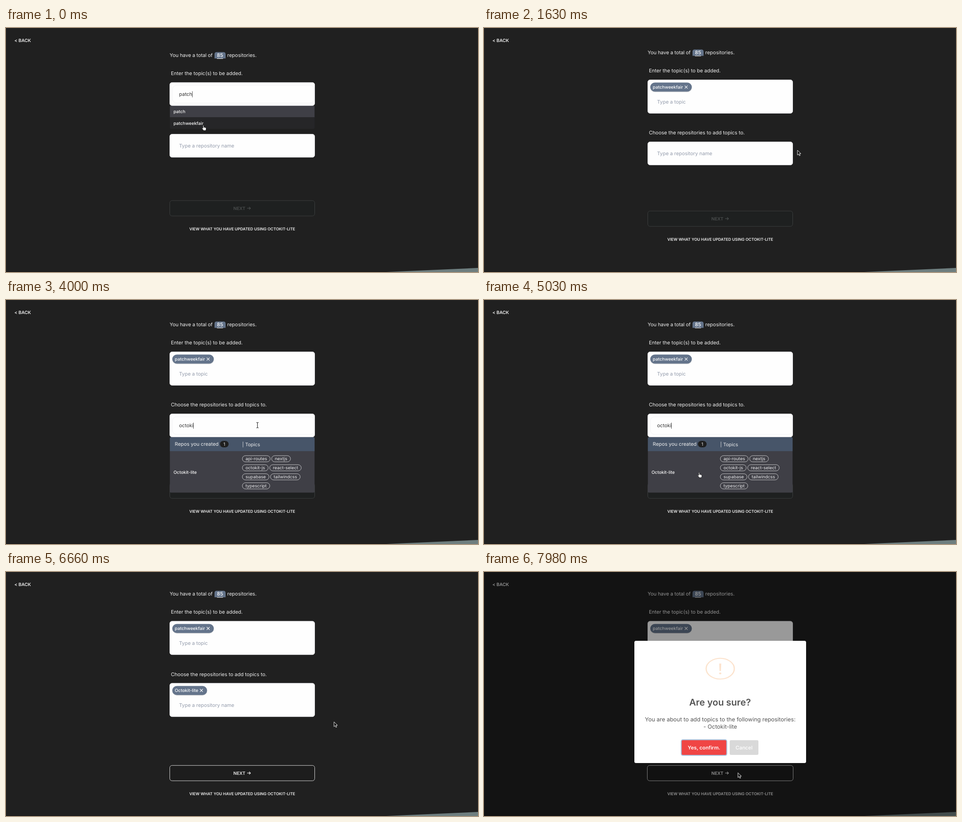
These frames come from a looping animation (1039 px wide and 539 px high, 8 s). An HTML page:

```html
<!DOCTYPE html>
<html lang="en">
<head>
<meta charset="utf-8">
<title>Add topics</title>
<style>
  html, body { margin: 0; width: 100%; height: 100%; overflow: hidden; background: #202020; }
  svg { display: block; width: 100%; height: 100%; }
  text { font-family: Inter, "Open Sans", sans-serif; white-space: pre; text-rendering: geometricPrecision; }
</style>
</head>
<body>
<svg id="stage" viewBox="0 0 1039 539"></svg>
<script>
const LOOP = 8000;
const LEFT = 360.5, WIDE = 319, BAR = 668;
const TOPIC = 'patchweekfair', REPO = 'Octokit-lite';
const SLATE = '#64748b', ZINC = '#3f3f46';
const stage = document.getElementById('stage');
const pen = document.createElement('canvas').getContext('2d');

// Each step changes part of the state and holds until the next one.
const steps = [
  [0, { level: 0, menu: 'match', focus: 'topic', typed: 'patch', caret: true, button: 'off', modal: null, cur: ['hand', 431, 215] }],
  [290, { level: 1, menu: 'topics', typed: '', caret: false, cur: ['hand', 437, 219] }],
  [440, { cur: ['hand', 530, 237] }],
  [590, { cur: ['arrow', 700, 258] }],
  [740, { cur: ['arrow', 758, 263.5] }],
  [1040, { cur: ['arrow', 764, 264] }],
  [1190, { cur: ['arrow', 778, 266] }],
  [1340, { menu: '', focus: '', cur: ['arrow', 772, 267] }],
  [1480, { cur: ['arrow', 745, 268] }],
  [1630, { cur: ['arrow', 690, 270] }],
  [1780, { cur: ['beam', 615, 275] }],
  [1930, { cur: ['beam', 568, 276] }],
  [2060, { focus: 'repo', caret: true, cur: ['beam', 553.5, 276.5] }],
  [2210, { menu: 'repos' }],
  [2660, { caret: false }],
  [3110, { caret: true }],
  [3410, { typed: 'o' }],
  [3560, { typed: 'oc', menu: 'single' }],
  [3710, { typed: 'oct' }],
  [3860, { typed: 'octok' }],
  [4000, { typed: 'octoki' }],
  [4440, { caret: false, cur: ['beam', 551, 284] }],
  [4590, { cur: ['arrow', 538, 316] }],
  [4740, { cur: ['hand', 508, 352] }],
  [4890, { caret: true, cur: ['hand', 480, 376] }],
  [5030, { cur: ['hand', 470, 381] }],
  [5330, { level: 2, menu: 'repos', typed: '', caret: false, button: 'on' }],
  [5480, { cur: ['hand', 530, 368] }],
  [5630, { cur: ['hand', 645, 340] }],
  [5780, { cur: ['arrow', 716, 323] }],
  [5920, { cur: ['arrow', 731.5, 319] }],
  [6510, { menu: '', focus: '' }],
  [6660, { cur: ['arrow', 722, 331] }],
  [6810, { cur: ['arrow', 682, 370] }],
  [6960, { cur: ['arrow', 626, 414] }],
  [7110, { button: 'hover', cur: ['hand', 581, 438] }],
  [7250, { cur: ['hand', 561, 445] }],
  [7390, { cur: ['hand', 555.5, 445.5] }],
  [7840, { button: 'on', modal: { scale: 0.75, dim: 0.1, tilt: 0.1, glow: 0 }, cur: ['arrow', 559, 443.5] }],
  [7980, { modal: { scale: 1, dim: 0.4, tilt: 0.74, glow: 0.4 } }]
];

const attrs = o => Object.entries(o).map(([k, v]) => `${k}="${v}"`).join(' ');
const rect = (x, y, width, height, fill, more = {}) =>
  `<rect ${attrs({ x, y, width, height, fill, ...more })}/>`;
const path = (d, more) => `<path ${attrs({ d, ...more })}/>`;
const text = (x, y, str, size = 11, fill = '#efefef', more = {}) =>
  `<text ${attrs({ x, y, 'font-size': size, fill, ...more })}>${str}</text>`;
const mid = { 'text-anchor': 'middle' };
const medium = { 'font-weight': 500 };
const bold = { 'font-weight': 600 };

function measure(str, size, weight = 400) {
  pen.font = `${weight} ${size}px Inter, "Open Sans", sans-serif`;
  pen.textRendering = 'geometricPrecision';
  return pen.measureText(str).width;
}

function backdrop() {
  return rect(0, 0, 1039, 539, '#202020') + rect(0, 538, 1039, 1, '#171315') +
    path('M837 539L1039 530V539Z', { fill: '#6e7e7f' }) +
    text(18.5, 30.8, '&lt; BACK', 9.85, '#efefef', bold);
}

function heading(y) {
  return text(360.3, y + 64, 'You have a total of', 11, '#efefef', { 'letter-spacing': -0.1 }) +
    path(`M459 ${y + 67.3}V${y + 58}q0-4.8 4.8-4.8H478.6q4.8 0 4.8 4.8V${y + 67.3}Z`, { fill: SLATE }) +
    text(471, y + 64, '85', 11, '#fff', { ...mid, ...medium }) +
    rect(464.3, y + 67, 13.4, 1.1, '#f4f4f4') +
    text(487, y + 64, 'repositories.') +
    text(363, y + 104, 'Enter the topic(s) to be added.');
}

function chip(y, label) {
  const w = measure(label, 9.75, 500) + 25;
  const x = 366 + w - 12.5;
  return rect(366, y + 1.2, w, 20, '#000', { rx: 10, opacity: 0.14 }) +
    rect(366, y, w, 20, SLATE, { rx: 10 }) +
    text(371.6, y + 13.5, label, 9.75, '#fff', medium) +
    path(`M${x - 3.2} ${y + 6.8}l6.4 6.4m0-6.4l-6.4 6.4`, { stroke: '#fff', 'stroke-width': 1.1 });
}

function field(y, label, hint, focused, s) {
  const h = label ? 73.8 : 51;
  const line = y + h - 25.2;
  const typed = focused ? s.typed : '';
  let out = rect(LEFT, y, WIDE, h, '#fefefe', { rx: 5, stroke: '#e4e4e7', 'stroke-width': 1 });
  if (focused) out += rect(366.3, line - 19.5, 312.5, 39, 'none', { rx: 9, stroke: '#efeff1', 'stroke-width': 0.8 });
  if (label) out += chip(y + 5.9, label);
  out += text(381, line + 4, typed || hint, 10.9, typed ? '#333' : '#949cac');
  if (focused && s.caret) out += rect(380.8 + measure(typed, 10.9), line - 6.5, 0.8, 13.5, '#222');
  return out;
}

function nextButton(y, mode, focused) {
  const [fill, edge, ink] = {
    off: ['#1e2020', '#3b3e3e', '#4b4e4e'],
    on: ['#1d1d1d', '#d4d4d4', '#ededed'],
    hover: ['#d2d2d2', '#d2d2d2', '#1c1c1c']
  }[mode];
  const grow = focused ? 1 : 0;
  return rect(LEFT - grow, y + 0.3, WIDE + 2 * grow, 33.9, fill, { rx: 5, stroke: edge, 'stroke-width': 1 }) +
    text(500.6, y + 20.8, 'NEXT', 9.7, ink, bold) +
    path(`M531 ${y + 17.2}h7.2m-3-3l3 3l-3 3`, { fill: 'none', stroke: ink, 'stroke-width': 1.2 });
}

const option = (y, str, x = 368.7) => text(x, y + 3.5, str, 9.7, '#fafafa', medium);

function tags(y, names) {
  let x = 520.2;
  return names.map(name => {
    const w = measure(name, 9.75) + 14;
    const out = rect(x, y - 6.8, w, 13.6, 'none', { rx: 6.8, stroke: '#e6e6e8', 'stroke-width': 0.8 }) +
      text(x + 7, y + 3.5, name, 9.75, '#ececee');
    x += w + 3.2;
    return out;
  }).join('');
}

function scrollbar(y, h, thumb) {
  return rect(BAR, y, LEFT + WIDE - BAR, h, '#334155') +
    rect(BAR, y, LEFT + WIDE - BAR, thumb, '#fff', { rx: 5.7 });
}

function repoHead(y, count, width) {
  const w = count > 9 ? 26 : 19;
  return rect(LEFT, y, width, 31, '#475569') +
    text(371.6, y + 19.2, 'Repos you created', 10.9) +
    rect(471, y + 8.3, w, 14.4, '#1f1f1f', { rx: 7.2 }) +
    text(471 + w / 2, y + 19, count, 9.75, '#eee', mid) +
    text(520, y + 19.8, '| Topics', 10.5);
}

const menus = {
  match: y => [51, rect(LEFT, y, WIDE, 25.6, ZINC) + rect(LEFT, y + 25.6, WIDE, 26, '#262628') +
    option(y + 12.8, 'patch') + option(y + 38.5, TOPIC)],
  topics: y => [171.3, rect(LEFT, y, WIDE, 172, ZINC) +
    ['challenge', 'css3', 'html', 'javascript', 'python', 'react']
      .map((name, i) => option(y + 24.4 + i * 25.7, name)).join('') +
    scrollbar(y, 172, 135.3)],
  repos: y => [171.2, rect(LEFT, y, WIDE, 172, ZINC) + repoHead(y, 73, BAR - LEFT) +
    option(y + 57, '01.112-ml-hmm') + tags(y + 47.8, ['hmm-viterbi-algorithm']) + tags(y + 67.7, ['python']) +
    option(y + 98.6, '50.012-network-notes') + tags(y + 99.2, ['network', 'restapi']) +
    option(y + 130.1, 'Allegro') + tags(y + 130.6, ['iot-device', 'kivy', 'laundry']) +
    option(y + 171, 'android-java-testing-exercises') +
    option(y + 171, 'No topics found for this repo', 520) +
    scrollbar(y, 172, 11.4)],
  single: y => [122.5, rect(LEFT, y, WIDE, 123, ZINC) + repoHead(y, 1, WIDE) + option(y + 77.2, REPO) +
    [['api-routes', 'nextjs'], ['octokit-js', 'react-select'], ['supabase', 'tailwindcss'], ['typescript']]
      .map((row, i) => tags(y + 47.8 + i * 19.95, row)).join('')]
};

function menu(name, y) {
  const [h, body] = menus[name](y);
  return `<clipPath id="menu">${rect(LEFT, y, WIDE, h, '#fff', { rx: 3 })}</clipPath>` +
    `<g clip-path="url(#menu)">${body}</g>`;
}

function dialog({ scale, dim, tilt, glow }) {
  const ink = '#545454', icon = '#f8bb86';
  return rect(0, 0, 1039, 539, '#000', { opacity: dim }) +
    `<g transform="translate(520 287) scale(${scale}) translate(-520 -287)">` +
    rect(331, 152, 378, 270, '#fff', { rx: 3.5 }) +
    `<g opacity="${glow}" transform="translate(520 213.6) scale(1 ${tilt})">` +
    `<circle r="31" fill="none" stroke="${icon}" stroke-width="2.8"/>` +
    path('M-2.3-15.5H2.3L1.5 7H-1.5Z', { fill: icon }) + `<circle cy="14" r="2.6" fill="${icon}"/></g>` +
    text(519.7, 295.4, 'Are you sure?', 20.4, ink, { ...mid, ...bold }) +
    text(520, 330.2, 'You are about to add topics to the following repositories:', 12.45, ink, mid) +
    text(520, 346, '- ' + REPO, 12.45, ink, mid) +
    rect(434.2, 370.6, 100.2, 34.4, '#f04545', { rx: 3.5, stroke: '#a9c3df', 'stroke-width': 2 }) +
    text(484.3, 392, 'Yes, confirm.', 11.2, '#fff', { ...mid, ...bold }) +
    rect(540.8, 371.5, 63.3, 32.5, '#d9d9d9', { rx: 3 }) +
    text(572.4, 392, 'Cancel', 11.2, '#fff', { ...mid, ...medium }) + '</g>';
}

const pointers = {
  arrow: path('M0 0V10.6L2.5 8.3L4.2 12.2L6 11.4L4.3 7.6H7.6Z',
    { fill: '#111', stroke: '#fff', 'stroke-width': 0.9, 'stroke-linejoin': 'round' }),
  hand: path('M2.6 1.2c0-1.5 1.9-1.5 1.9 0V4.6c.4-.8 1.7-.6 1.8.3c.5-.7 1.6-.4 1.7.5c.5-.5 1.5-.2 1.5.8V8.6c0 1-.9 1.6-.9 3H3.9C3.5 9.9 1.6 8.6.6 7c-.6-1 .6-1.8 1.4-1l.6.7Z',
    { fill: '#fff', stroke: '#111', 'stroke-width': 0.8 }),
  beam: path('M-2.6-6Q0-6 0-4.6Q0-6 2.6-6M0-4.6V4.6M-2.6 6Q0 6 0 4.6Q0 6 2.6 6',
    { fill: 'none', stroke: '#222', 'stroke-width': 1.1 })
};

function scene(s) {
  const top = -5.8 * s.level;
  const y1 = 120.4 + top;
  const end1 = y1 + (s.level > 0 ? 73.8 : 51);
  const y2 = end1 + 63.2;
  const end2 = y2 + (s.level > 1 ? 73.8 : 51);
  const yNext = 381 + 23 * s.level;
  const [kind, x, y] = s.cur;
  return backdrop() + heading(top) +
    text(363, y2 - 16.2, 'Choose the repositories to add topics to.') +
    field(y1, s.level > 0 ? TOPIC : '', 'Type a topic', s.focus === 'topic', s) +
    field(y2, s.level > 1 ? REPO : '', 'Type a repository name', s.focus === 'repo', s) +
    nextButton(yNext, s.button, s.modal) +
    text(520, yNext + 66.2, 'VIEW WHAT YOU HAVE UPDATED USING OCTOKIT-LITE', 8.63, '#efefef', { ...mid, ...bold }) +
    (s.menu ? menu(s.menu, (s.focus === 'topic' ? end1 : end2) + 0.3) : '') +
    (s.modal ? dialog(s.modal) : '') +
    `<g transform="translate(${x} ${y})">${pointers[kind]}</g>`;
}

const states = [];
for (const [at, change] of steps) states.push({ ...states.at(-1), ...change, at });

const start = performance.now();
let shown = null;
function draw() {
  const t = (performance.now() - start) % LOOP;
  const state = states.findLast(s => s.at <= t) || states[0];
  if (state !== shown) {
    stage.innerHTML = scene(state);
    shown = state;
  }
  requestAnimationFrame(draw);
}
draw();
</script>
</body>
</html>
```
